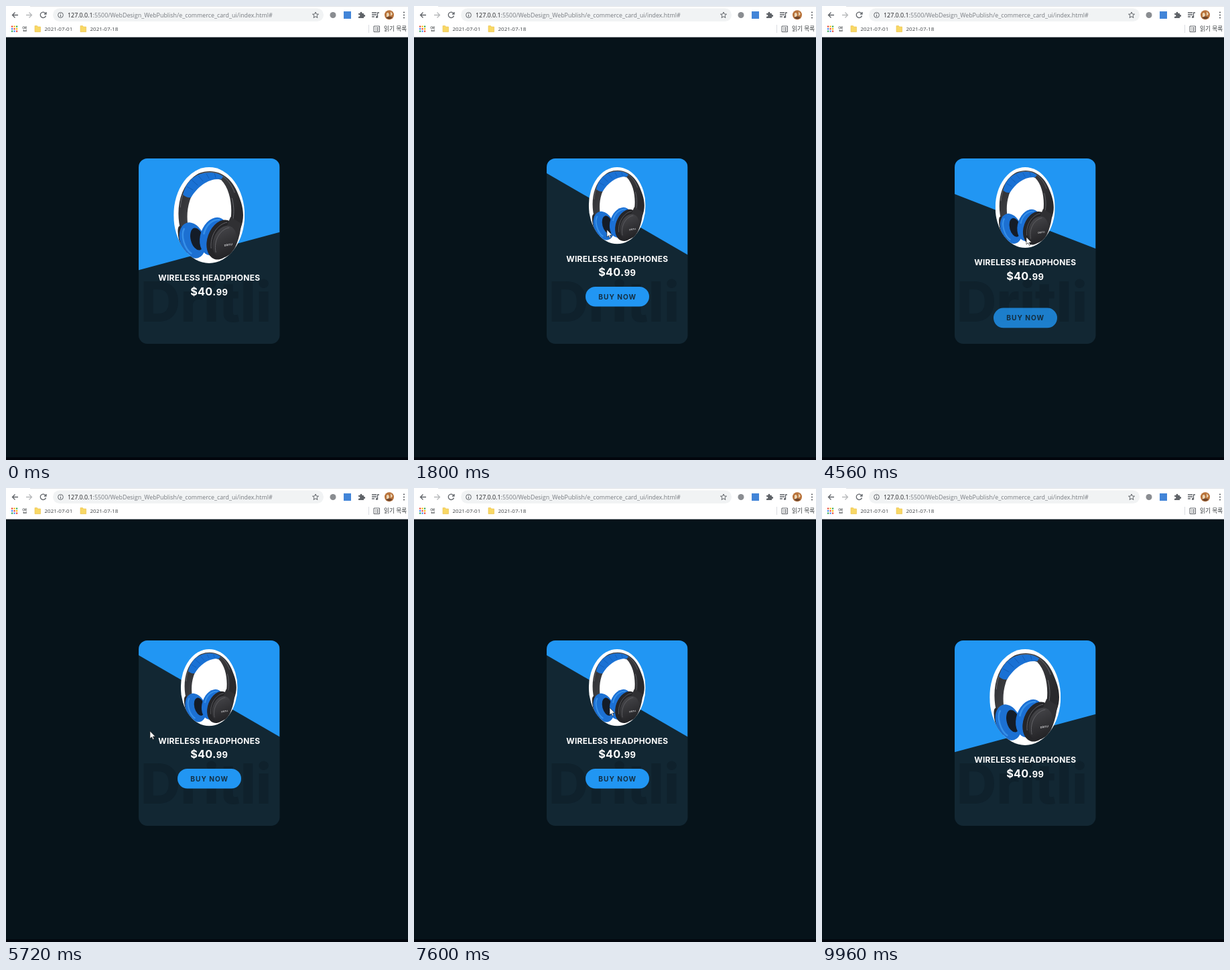
An HTML page that plays this animation: 600x676 px, repeating every 10 s.

```html
<!DOCTYPE html>
<html lang="en">
<head>
<meta charset="utf-8">
<title>Product card</title>
<style>
html, body { margin: 0; width: 100%; height: 100%; overflow: hidden; background: #06131a; }
svg { display: block; width: 600px; height: 676px; }
.ui { font-family: "Open Sans", "Noto Sans CJK KR", "Noto Sans CJK", sans-serif; }
.shop { font-family: Inter, Roboto, sans-serif; font-weight: 700; text-anchor: middle; }
.line { fill: none; stroke: #5f6368; stroke-width: 1.3; }
</style>
</head>
<body>
<svg viewBox="0 0 600 676">
  <defs>
    <clipPath id="cardClip"><rect x="198" y="227" width="210.500" height="276" rx="13"/></clipPath>
    <clipPath id="photoClip"><ellipse cx="303" cy="311.500" rx="53" ry="71.500"/></clipPath>
    <linearGradient id="bandShade" x2="1" y2=".4">
      <stop stop-color="#292a2d"/><stop offset=".5" stop-color="#424347"/><stop offset="1" stop-color="#29292c"/>
    </linearGradient>
    <linearGradient id="cupShade" x2=".7" y2="1">
      <stop stop-color="#4b4b4f"/><stop offset="1" stop-color="#222225"/>
    </linearGradient>
  </defs>

  <rect width="600" height="676" fill="#06131a"/>
  <rect y="672" width="600" height="4" fill="#02060d"/>

  <!-- browser bar -->
  <g class="ui">
    <rect width="600" height="46.500" fill="#fff"/>
    <rect x="36" width="564" height="1" fill="#dee1e6"/>
    <rect x="70" y="3.500" width="404" height="19.500" rx="9.750" fill="#f1f3f4"/>
    <path class="line" d="M18 13.500H9.500M13.500 9.500L9.500 13.500L13.500 17.500M59 11A4.200 4.200 0 1 0 59.500 14.500M60 9V12H57"/>
    <path class="line" stroke-opacity=".45" d="M30 13.500H38.500M34.500 9.500L38.500 13.500L34.500 17.500"/>
    <circle class="line" cx="81.500" cy="13.500" r="3.900" style="stroke-width:1"/>
    <path class="line" style="stroke-width:1" d="M81.500 13V16M81.500 11V12"/>
    <text x="92" y="16.600" font-size="8.900" fill="#777b80"><tspan fill="#202124">127.0.0.1</tspan>:5500/WebDesign_WebPublish/e_commerce_card_ui/index.html#</text>
    <path class="line" style="stroke-width:1" d="M462 9L463.300 12L466.500 12.200L464 14.300L464.900 17.500L462 15.700L459.100 17.500L460 14.300L457.500 12.200L460.700 12Z"/>
    <circle cx="488" cy="13.500" r="4.500" fill="#8a8d91"/>
    <rect x="504" y="8" width="11" height="11" fill="#4285d8"/>
    <path fill="#5f6368" d="M526 11H528.500A1.600 1.600 0 1 1 531.500 11H534V13A1.600 1.600 0 1 1 534 16V18H526V15.500A1.500 1.500 0 1 0 526 13Z"/>
    <path class="line" d="M546 10H553M546 13H553M546 16H550M554.500 16.500V10H557"/>
    <circle cx="553.500" cy="16.300" r="1.600" fill="#5f6368"/>
    <circle cx="572" cy="13.300" r="7" fill="#b9743c"/>
    <path fill="#ead5b5" d="M568 11Q571 8 572 13Q571 18 568 17ZM574 8L577 12L574 15Z"/>
    <path fill="#70472c" d="M567 17Q572 14 577 17Q572 22 567 17Z"/>
    <g fill="#5f6368"><circle cx="594" cy="9.500" r="1.100"/><circle cx="594" cy="13.500" r="1.100"/><circle cx="594" cy="17.500" r="1.100"/></g>
    <g id="apps"></g>
    <g font-size="8" fill="#3c4043">
      <text x="24" y="37">앱</text>
      <path id="folder" fill="#f8d865" stroke="#e9bd43" stroke-width=".6" d="M43 29.500H46.500L47.500 31H51.500V38.500H43Z"/>
      <use href="#folder" x="68"/>
      <text x="57.500" y="37">2021-07-01</text>
      <text x="125.500" y="37">2021-07-18</text>
      <path stroke="#dadce0" d="M541.500 28V40"/>
      <path class="line" style="stroke-width:1" d="M549 30H557.500V38.500H549ZM551 32.500H552M553 32.500H556M551 34.500H552M553 34.500H556M551 36.500H552M553 36.500H556"/>
      <text x="564" y="37.200" font-size="8.700">읽기 목록</text>
    </g>
  </g>

  <!-- product card -->
  <g clip-path="url(#cardClip)">
    <rect x="198" y="227" width="211" height="276" fill="#122733"/>
    <path id="slope" fill="#2196f3"/>
    <text x="201" y="470" font-family="Inter, sans-serif" font-weight="800" font-size="82" fill="#0f212c">Dritli</text>

    <g id="photo"><g clip-path="url(#photoClip)">
      <rect x="250" y="240" width="106" height="143" fill="#fff"/>
      <!-- head band and padding -->
      <path fill="url(#bandShade)" d="M261 337C251 300 261 263 288 249C311 240 333 251 344 275C352 293 358 310 350 331L334 324C339 302 335 273 321 259C302 251 282 267 274 290C269 306 270 319 272 332Z"/>
      <path fill="none" stroke="#66676c" stroke-width="1" d="M260 300C262 272 277 253 298 248C318 245 334 258 341 278M337 286C341 300 340 312 338 321"/>
      <path fill="#1a71d4" d="M264 281C267 266 276 255 290 250C303 246 317 248 324 254L321 258C302 256 286 269 276 285Q269 286 264 281Z"/>
      <path fill="none" stroke="#1057ad" stroke-width=".8" d="M270 269L279 274M277 259L286 267M287 253L294 261M299 250L303 257M311 249L313 256"/>
      <!-- far ear cushion -->
      <ellipse cx="264" cy="348" rx="6" ry="21" fill="#29292c" transform="rotate(-14 264 348)"/>
      <ellipse cx="278" cy="349" rx="18.500" ry="27.500" fill="#1c70d2" transform="rotate(-19 278 349)"/>
      <ellipse cx="285" cy="347" rx="9.500" ry="17" fill="#141c28" transform="rotate(-15 285 347)"/>
      <path fill="none" stroke="#3690e9" stroke-width="2.500" d="M266 331C260 341 266 362 277 369"/>
      <!-- near ear cup -->
      <ellipse cx="310" cy="343" rx="20" ry="29" fill="#1b70d5" transform="rotate(19 310 343)"/>
      <path fill="none" stroke="#358fe8" stroke-width="2.500" d="M295 340C298 326 307 318 319 318"/>
      <ellipse cx="321" cy="348" rx="20.500" ry="30.500" fill="#252528" transform="rotate(20 321 348)"/>
      <path fill="#303033" d="M335 314L351 324C349 345 342 363 333 374L324 340Z"/>
      <ellipse cx="326" cy="351" rx="17" ry="24.500" fill="url(#cupShade)" transform="rotate(20 326 351)"/>
      <path fill="none" stroke="#68686c" stroke-width=".9" d="M306 361C304 342 315 325 330 322M313 367C309 347 321 332 333 330"/>
      <text x="332" y="357" class="shop" font-size="3.900" fill="#d5d5d7" transform="rotate(-10 332 357)">DRITLI</text>
    </g></g>

    <g id="content" class="shop" fill="#fff">
      <text x="303.300" y="409.300" font-size="12" letter-spacing=".22">WIRELESS HEADPHONES</text>
      <text x="303.200" y="431" font-size="16.200" letter-spacing=".3">$40.<tspan font-size="13">99</tspan></text>
    </g>
    <g id="buy" class="shop">
      <rect x="256" y="418" width="95" height="29.600" rx="14.800" fill="#2196f3"/>
      <text x="303.700" y="436.600" font-size="10.200" letter-spacing="1" fill="#153044">BUY NOW</text>
    </g>
  </g>

  <path id="cursor" fill="#fff" stroke="#111" stroke-width=".6" d="M0 0V11L2.600 8.700L4.300 12.500L6 11.800L4.400 8.100H7.800Z"/>
</svg>
<script>
const LOOP = 10000, STEP = 40, HOVER_TIME = 500;
const el = id => document.getElementById(id);
const [slope, photo, content, buy, cursor] = ["slope", "photo", "content", "buy", "cursor"].map(el);

// Pointer visits: time, x, y
const visits = [
  [[440, 39, 400], [620, 198, 365], [800, 280, 335], [1080, 292, 330], [1780, 292, 330],
   [2240, 198, 400], [2800, 132, 447], [2840, 115, 447], [2920, 90, 447]],
  [[4240, 108, 400], [4310, 198, 372], [4560, 305, 344], [5000, 294, 334], [5440, 294, 334],
   [5780, 198, 368], [6280, 137, 375], [6840, 137, 375], [7060, 198, 360], [7300, 285, 330],
   [7560, 292, 327], [8320, 292, 327], [8900, 198, 400], [9360, 160, 440], [9960, 84, 536]]
];
// Times at which the pointer enters and leaves the card
const hovers = [[620, 2240], [4310, 5780], [7060, 8900]];

const colors = ["#ea4335", "#fbbc04", "#34a853", "#4285f4"];
for (let i = 0; i < 9; i++) {
  const dot = document.createElementNS("http://www.w3.org/2000/svg", "rect");
  const attrs = { x: 8 + i % 3 * 3.5, y: 29.5 + Math.floor(i / 3) * 3.5, width: 2.2, height: 2.2, fill: colors[i % 4] };
  for (const key in attrs) dot.setAttribute(key, attrs[key]);
  el("apps").append(dot);
}

// CSS "ease": cubic-bezier(.25, .1, .25, 1)
function ease(x) {
  if (x <= 0 || x >= 1) return x <= 0 ? 0 : 1;
  const bezier = (a, b, s) => 3 * a * s * (1 - s) ** 2 + 3 * b * s * s * (1 - s) + s ** 3;
  let low = 0, high = 1;
  for (let i = 0; i < 20; i++) {
    const mid = (low + high) / 2;
    if (bezier(.25, .25, mid) < x) low = mid; else high = mid;
  }
  return bezier(.1, 1, low);
}

const hoverAt = t => hovers.reduce((sum, [enter, leave]) =>
  sum + ease((t - enter) / HOVER_TIME) - ease((t - leave) / HOVER_TIME), 0);

function pointerAt(t) {
  const path = visits.find(v => t >= v[0][0] && t < v[v.length - 1][0]);
  if (!path) return null;
  const i = path.findIndex(key => key[0] > t);
  const [t0, x0, y0] = path[i - 1], [t1, x1, y1] = path[i];
  const k = (t - t0) / (t1 - t0);
  return [x0 + (x1 - x0) * k, y0 + (y1 - y0) * k];
}

function draw() {
  const t = Math.floor(performance.now() % LOOP / STEP) * STEP;
  const p = hoverAt(t);

  const middle = 365 - 55.2 * p;
  const rise = 105.25 * Math.tan((-15 + 45 * p) * Math.PI / 180);
  slope.setAttribute("d", `M198 220H408.500V${middle + rise}L198 ${middle - rise}Z`);

  photo.setAttribute("transform", `translate(303.200 240) scale(${1 - .2 * p}) translate(-303 -240)`);
  content.setAttribute("transform", `translate(0 ${-28.6 * p})`);
  buy.setAttribute("transform", `translate(0 ${(28.6 + 131.4) * (1 - p)})`);
  buy.setAttribute("opacity", p);

  const pointer = pointerAt(t);
  cursor.setAttribute("visibility", pointer ? "visible" : "hidden");
  if (pointer) cursor.setAttribute("transform", `translate(${pointer})`);
  requestAnimationFrame(draw);
}
draw();
</script>
</body>
</html>
```
